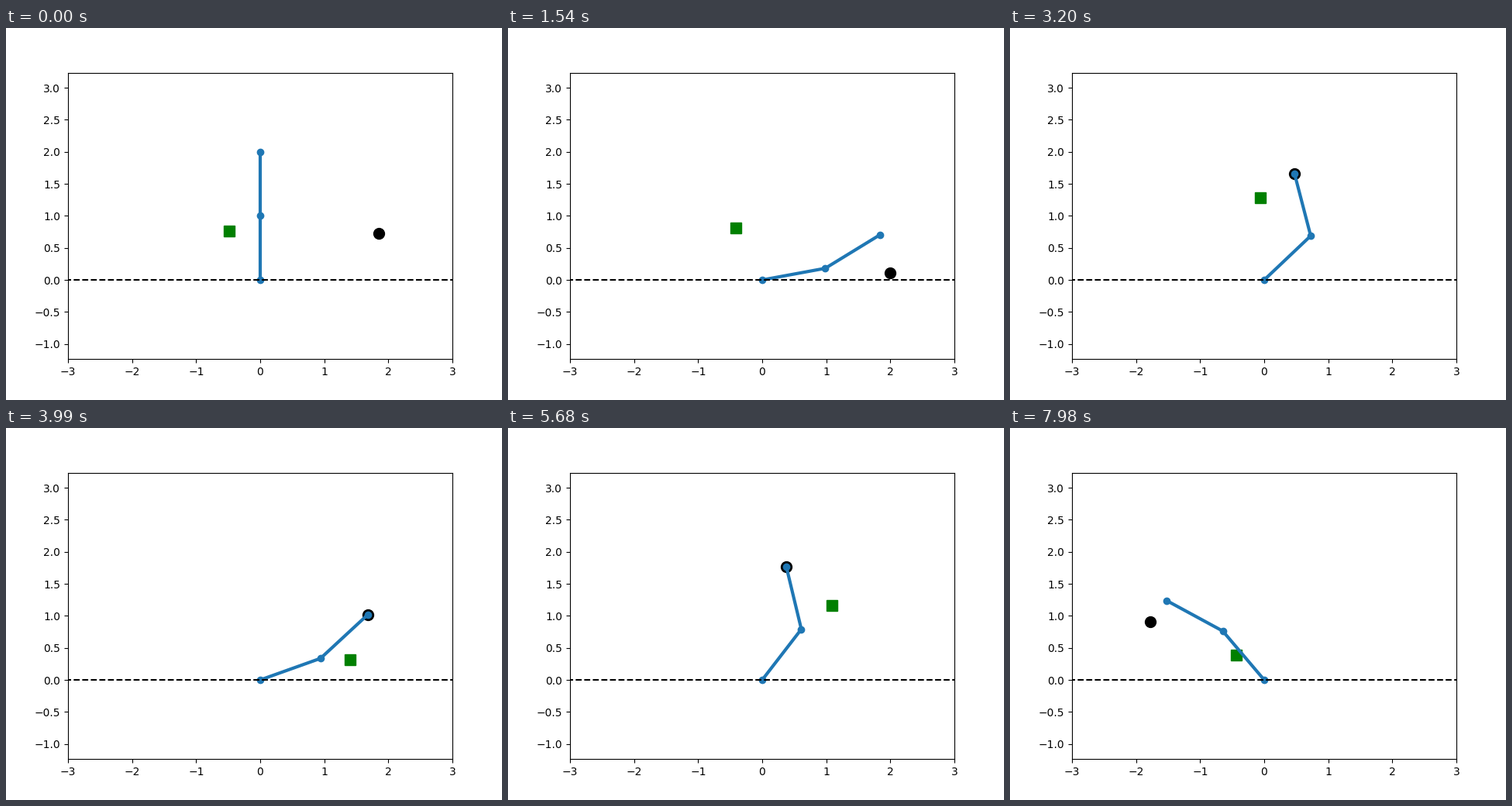
A matplotlib script that plays this animation: 640x480 px, repeating every 8000 ms.

```python
import numpy as np
import matplotlib.pyplot as plt
from matplotlib.animation import FuncAnimation

LOOP, STEP = 8000, 20      # ms
TICK, HOLD = 30, 100       # ms per pose, pause after a drop
MAX_TURN = 0.1             # radians per pose

# where the balls appear, and where each one is dropped
BALLS = [(1.855, 0.726), (1.9967, 0.1064), (1.304, 1.508), (1.633, 1.141),
         (-1.533, 1.282), (1.379, 1.441), (-1.775, 0.905)]
DROPS = [(-0.484, 0.763), (-0.407, 0.807), (-0.06, 1.283), (1.403, 0.315),
         (1.089, 1.162), (0.695, 0.2), (-0.436, 0.388)]


def solve(point):
    """Joint angles that put the tip of the unit-link arm on a point."""
    x, y = point
    bend = np.arccos(np.hypot(x, y) / 2)
    return np.array([np.arctan2(y, x) - bend, 2 * bend])


def joints(q):
    """Positions of base, elbow and tip."""
    a = np.cumsum(q)
    links = np.column_stack([np.cos(a), np.sin(a)])
    return np.vstack([(0, 0), np.cumsum(links, axis=0)])


def sweep(q0, q1):
    """Arm points for an even turn of both joints."""
    count = int(np.max(np.abs(q1 - q0)) / MAX_TURN)
    return [joints(q) for q in np.linspace(q0, q1, count)]


def plan():
    """List of (start time, arm points, ball, drop)."""
    poses, t = [], 0
    q = solve((0, 2))
    for ball, drop in zip(BALLS, DROPS):
        grab, release = solve(ball), solve(drop)
        reach = [(arm, ball) for arm in sweep(q, grab)]
        carry = [(arm, arm[2]) for arm in sweep(grab, release)]
        for arm, spot in reach + carry:
            poses.append((t, arm, spot, drop))
            t += TICK
        t += HOLD - TICK
        q = release
    return poses


poses = plan()
starts = [p[0] for p in poses]

fig, ax = plt.subplots(figsize=(6.4, 4.8), dpi=100)
drop_mark, = ax.plot([], [], "gs", markersize=10)
ball_mark, = ax.plot([], [], "ko", markersize=10)
arm_line, = ax.plot([], [], "o-", color="C0", lw=3)
ax.plot([-4, 4], [0, 0], "k--")

ax.set_xlim(-3, 3)
half = 3 * 369.6 / 496     # equal scale on both axes
ax.set_ylim(1 - half, 1 + half)


def update(i):
    t = (i + 0.5) * STEP
    _, arm, ball, drop = poses[np.searchsorted(starts, t, side="right") - 1]
    arm_line.set_data(*arm.T)
    ball_mark.set_data([ball[0]], [ball[1]])
    drop_mark.set_data([drop[0]], [drop[1]])
    return drop_mark, ball_mark, arm_line


anim = FuncAnimation(fig, update, frames=LOOP // STEP, interval=STEP,
                     repeat=True, repeat_delay=0)
plt.show()
```
